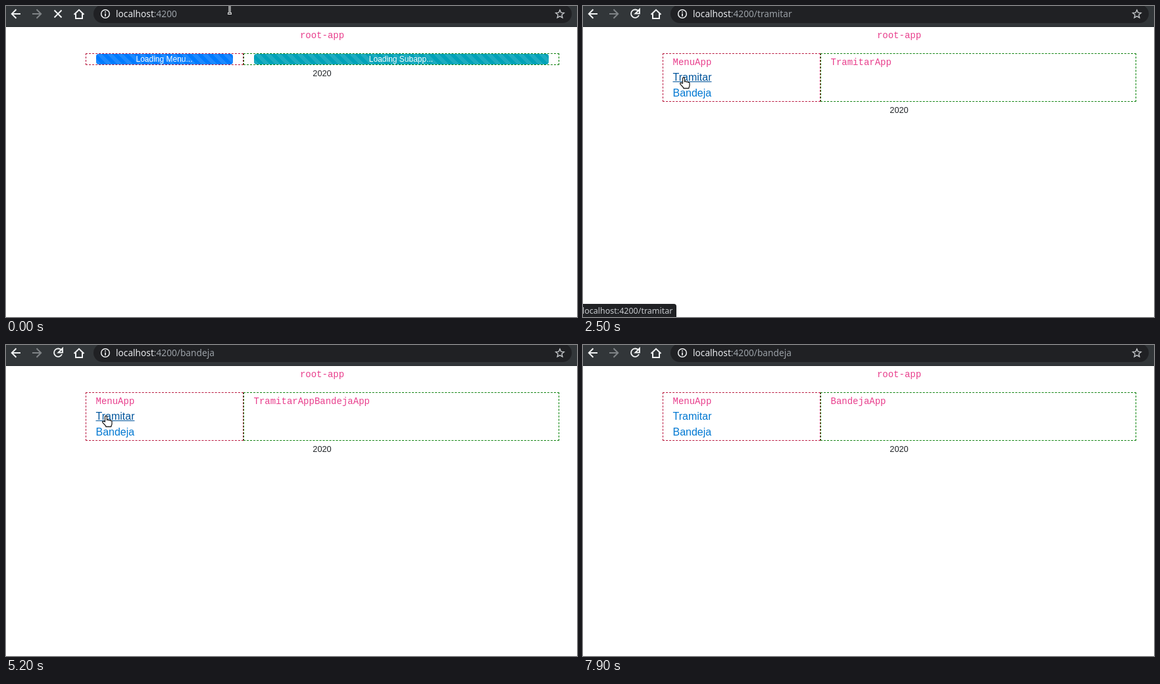
Write an HTML page that moves like this. It is 868 px wide and 474 px high and loops after 8.6 s.

```html
<!DOCTYPE html>
<html lang="es">
<head>
<meta charset="utf-8">
<title>root-app</title>
<style>
  html, body { margin: 0; width: 100%; height: 100%; overflow: hidden; background: #fff; }
  #stage { position: relative; width: 868px; height: 474px; overflow: hidden; color: #212529;
    font: 16px/24px "Liberation Sans", Arial, sans-serif; }
  #bar { position: absolute; left: 0; top: 0; width: 868px; height: 31px;
    background: #323639; border-bottom: 1px solid #222528; }
  #pill { position: absolute; left: 133px; top: -2px; width: 727px; height: 28px;
    border-radius: 14px; background: #202124; }
  #address, #status { font-family: "Noto Sans", "Open Sans", sans-serif; white-space: pre; }
  #address { position: absolute; left: 167px; top: 0; font-size: 13.7px; color: #9aa0a6; }
  #address b { font-weight: normal; color: #e8eaed; }
  svg { position: absolute; left: 0; top: 0; overflow: visible; }
  #page { position: absolute; left: 120.5px; top: 32px; width: 720px; }
  code { font: 14px "Liberation Mono", monospace; color: #e83e8c; }
  .center { text-align: center; }
  small { font-size: 12.8px; }
  #row { display: flex; margin-top: 16px; }
  .col { box-sizing: border-box; padding: 0 15px; border: 1px dashed #b8123c; width: 240px; }
  .col + .col { width: 480px; border-color: #008000; }
  .link { color: #0078d2; }
  .link.hover { color: #00559c; text-decoration: underline; }
  .progress { height: 16px; border-radius: 4px; color: #fff; text-align: center;
    font-size: 12px; line-height: 16px; background: #007bff
    linear-gradient(45deg, #ffffff1c 25%, #0000 25% 50%, #ffffff1c 50% 75%, #0000 75%) 0 0 / 16px 16px; }
  .info { background-color: #00a2b8; }
  #status { position: absolute; left: 0; top: 454px; width: 142px; height: 20px; text-indent: -1px;
    border-radius: 0 4px 0 0; background: #202124; color: #c6c9cd; font-size: 12.5px; line-height: 21px; }
  [hidden] { display: none !important; }
</style>
</head>
<body>
<div id="stage">
  <div id="bar"></div>
  <div id="pill"></div>
  <div id="address"><b>localhost</b>:4200<span id="route"></span></div>

  <svg width="868" height="32" fill="none" stroke="#f1f3f4" stroke-width="2">
    <path d="M22 12H9.5M15.5 5.3L8.8 12l6.7 6.7"/>
    <path d="M40 12h12.5M46.500 5.300l6.700 6.700l-6.700 6.700" stroke="#7f8386"/>
    <path id="stop" d="M73.500 6.500l11 11m0-11l-11 11"/>
    <path id="reload" d="M84.600 8.500A6.200 6.200 0 1 0 85 14M86 5v6.500h-6.500z" />
    <path d="M103.500 13L111 5.800l7.500 7.200M106 11.500v7.500h10v-7.500"/>
    <circle cx="151" cy="12" r="6.300" stroke-width="1.500"/>
    <path d="M151 8.200v1.700m0 1.300v4.600" stroke-width="1.700"/>
    <path d="M842 6l1.800 4.100 4.500.4-3.400 3 1 4.400-3.900-2.300-3.900 2.300 1-4.400-3.400-3 4.500-.4z"
      stroke="#c4c7ca" stroke-width="1.400"/>
  </svg>

  <div id="page">
    <div class="center"><code>root-app</code></div>
    <div id="row">
      <div class="col">
        <div class="progress loading">Loading Menu...</div>
        <div class="loaded">
          <div><code>MenuApp</code></div>
          <div><span class="link" id="tramitar">Tramitar</span></div>
          <div><span class="link" id="bandeja">Bandeja</span></div>
        </div>
      </div>
      <div class="col">
        <div class="progress info loading">Loading Subapp...</div>
        <div class="loaded"><code id="content"></code></div>
      </div>
    </div>
    <div class="center"><small>2020</small></div>
  </div>

  <div id="status"></div>

  <svg width="868" height="474" stroke-linejoin="round">
    <g id="beam" fill="none">
      <path d="M340 -2V11M337 11.500h6" stroke="#fff" stroke-width="3"/>
      <path d="M340 -2V11M337.500 11.500h5" stroke="#25282b"/>
    </g>
    <g id="arrow">
      <path d="M1 1V16l3.500-3 2.400 5.200 2.500-1-2.300-5.200H12z" fill="#0003" stroke="#0002" stroke-width="2"/>
      <path d="M0 0V15l3.500-3 2.400 5.200 2.500-1-2.300-5.200H10.600z" fill="#222" stroke="#fff" paint-order="stroke" stroke-width="1.800"/>
    </g>
    <path id="hand" fill="#fff" stroke="#222" stroke-width="1.300"
      d="M5.500 10V2.500a1.500 1.500 0 0 1 3 0V7.500c.3-1 2.600-1 2.800.4.600-.9 2.400-.6 2.500.6.700-.6 2.200-.3 2.200 1.100V13c0 2-1 2.500-1.200 4.500H7c-.5-2.500-3.500-4-5.200-6.700-.8-1.300.8-2.300 1.900-1.400z"/>
  </svg>
</div>

<script>
const LOOP = 8600;
const $ = id => document.getElementById(id);

// Each track holds [start time, value...] entries; a value stays until the next entry.
const pointer = [
  [0, 'beam'], [100, ''],
  [1800, 'arrow', 128, 129], [2000, 'hand', 148, 112], [2100, 'hand', 146, 108],
  [2600, 'hand', 150, 128], [2700, 'hand', 152, 131],
  [3000, 'arrow', 154, 149], [3100, 'arrow', 154, 155],
  [3200, 'hand', 155, 132], [3400, 'hand', 150, 130], [3500, 'hand', 148, 129],
  [4100, 'arrow', 152, 148], [4200, 'arrow', 150, 156], [4400, 'arrow', 148, 160],
  [4600, 'arrow', 149, 152], [4800, 'hand', 148, 132], [5000, 'hand', 147, 124],
  [5100, 'hand', 145, 107], [5500, 'arrow', 118, 114], [5600, 'arrow', 93, 125],
  [5800, 'arrow', 93, 155], [6000, 'arrow', 92, 157],
  [6200, 'arrow', 114, 150], [6300, 'hand', 138, 130], [6400, 'hand', 147, 129],
  [6900, 'arrow', 108, 141], [7000, 'arrow', 76, 142], [7100, 'arrow', 54, 142],
  [7200, 'arrow', 45, 142], [7400, 'arrow', 42, 110], [7500, 'arrow', 36, 58],
  [7600, 'arrow', 32, 28], [7700, 'arrow', 30, 14], [7900, '']
];
const hover = [
  [0, ''], [2000, 'tramitar'], [2600, 'bandeja'], [3000, ''], [3200, 'bandeja'], [4100, ''],
  [4800, 'bandeja'], [5000, 'tramitar'], [5500, ''], [6300, 'bandeja'], [6900, '']
];
const statusText = [
  [0, 'tramitar'], [2600, 'bandeja'], [5000, 'tramitar'], [6300, 'bandeja']
];
const statusFade = [
  [0, 0], [2100, .5], [2200, 1], [3000, .6], [3100, .05], [3200, 0],
  [3400, .4], [3500, .8], [3700, 1], [4200, .6], [4300, .2], [4400, 0],
  [5300, .6], [5400, 1], [5800, .25], [6000, 0],
  [6600, .5], [6700, 1], [7000, .6], [7100, .1], [7200, 0]
];
const view = [
  [0, '', ''], [2400, '/tramitar', ''], [2500, '/tramitar', 'TramitarApp'],
  [3900, '/bandeja', 'TramitarAppBandejaApp'], [5400, '/tramitar', 'TramitarApp'],
  [6800, '/bandeja', 'BandejaApp']
];

const at = (track, t) => track.findLast(entry => entry[0] <= t).slice(1);
const show = (el, on) => el.toggleAttribute('hidden', !on);

function render(t) {
  const loading = t < 200;
  document.querySelectorAll('.loading').forEach(el => show(el, loading));
  document.querySelectorAll('.loaded').forEach(el => show(el, !loading));
  show($('stop'), t < 300);
  show($('reload'), t >= 300);
  $('reload').setAttribute('stroke-width', 1.9);

  const [kind, x, y] = at(pointer, t);
  for (const id of ['beam', 'arrow', 'hand']) show($(id), id === kind);
  if (x !== undefined) $(kind).setAttribute('transform', `translate(${x} ${y})`);

  const [link] = at(hover, t);
  for (const id of ['tramitar', 'bandeja']) $(id).classList.toggle('hover', id === link);

  [$('route').textContent, $('content').textContent] = at(view, t);
  $('status').textContent = 'localhost:4200/' + at(statusText, t)[0];
  $('status').style.opacity = at(statusFade, t)[0];
}

const start = performance.now();
function tick() {
  render((performance.now() - start) % LOOP);
  requestAnimationFrame(tick);
}
tick();
</script>
</body>
</html>
```
